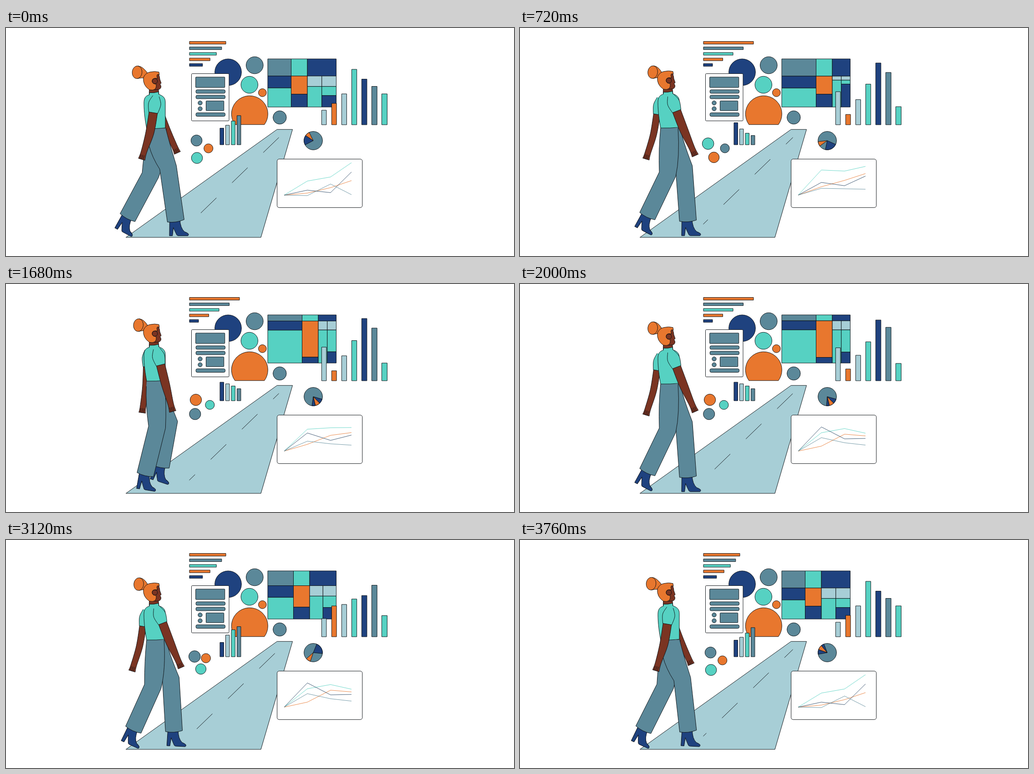
These frames come from a looping animation (1116 by 502 pixels, 3840 ms). An HTML page with a canvas:

```html
<!DOCTYPE html>
<html lang="en">
<head>
<meta charset="utf-8">
<title>Walking through data</title>
<style>
html, body { margin: 0; width: 100%; height: 100%; overflow: hidden; background: #fff; }
canvas { display: block; }
</style>
</head>
<body>
<canvas id="stage" width="1116" height="502"></canvas>
<script>
const ctx = document.getElementById('stage').getContext('2d');
const ORANGE = '#e8772e', SLATE = '#5b8899', TEAL = '#56d1c2', NAVY = '#1f427f',
  LIGHT = '#a7ced6', SKIN = '#7a3422', INK = '#0b0f14';
const LOOP = 3840, STEP = 80, STRIDE = 1280, RAD = Math.PI / 180;

const lerp = (a, b, p) => a + (b - a) * p;
const mix = (a, b, p) => a.map((v, i) => Array.isArray(v) ? mix(v, b[i], p) : lerp(v, b[i], p));
const ease = p => p * p * (3 - 2 * p);
const part = (t, a, b) => Math.min(1, Math.max(0, (t - a) / (b - a)));
const span = (t, a, b) => ease(part(t, a, b));
const bump = (t, mid, half) => Math.max(0, 1 - ((t - mid) / half) ** 2);
const ramp = ([first, step, bend], i) => first + step * i + bend * i * i;

// Moves through the states, one [start, end] pair per change, and back to the first.
function tween(t, states, spans) {
  let i = 0;
  while (i < spans.length - 1 && t >= spans[i + 1][0]) i++;
  return mix(states[i], states[(i + 1) % states.length], span(t, ...spans[i]));
}

function paint(fill, stroke = INK) {
  if (fill) { ctx.fillStyle = fill; ctx.fill(); }
  if (stroke) { ctx.strokeStyle = stroke; ctx.stroke(); }
}
function box(x0, y0, x1, y1, fill, r = 0) {
  ctx.beginPath();
  ctx.roundRect(x0, y0, x1 - x0, y1 - y0, r);
  paint(fill);
}
function disc(x, y, r, fill) {
  ctx.beginPath();
  ctx.arc(x, y, r, 0, 7);
  paint(fill);
}
function poly(pts, fill, stroke = INK, close = true) {
  ctx.beginPath();
  pts.forEach(p => ctx.lineTo(...p));
  if (close) ctx.closePath();
  paint(fill, stroke);
}
function shape(d, fill) {
  const p = new Path2D(d);
  ctx.fillStyle = fill;
  ctx.fill(p);
  ctx.strokeStyle = INK;
  ctx.stroke(p);
}

// ---- Scenery ----
function road(t) {
  poly([[263.5, 461], [595.5, 223.3], [629.5, 223.3], [560, 461]], LIGHT);
  const right = 599.5, left = 402.5, gap = 68.6;
  for (let x = right + gap - t * 0.0688 % gap; x > left; x -= gap) {
    const a = Math.min(x, right), b = Math.max(x - gap / 2, left);
    if (a > b) poly([a, b].map(v => [v, 241 + (right - v) * 0.9695]), null, INK, false);
  }
}

function rankBars(t) {
  const curve = tween(t, [[80, -8, -1.2], [110, -22.5, 0]], [[0, 720], [2160, 2880]]);
  [ORANGE, SLATE, TEAL, ORANGE, NAVY].forEach((fill, i) => {
    const y = 29.6 + i * 12.2;
    box(403, y, 403 + ramp(curve, i), y + 5.8, fill);
  });
}

function page() {
  disc(488, 97.3, 29.3, NAVY);
  box(407.5, 100.5, 490, 204.5, '#fff', 2);
  box(416.7, 108, 480.7, 131, SLATE, 1);
  for (const y of [136, 148, 186.7]) box(417.2, y, 481.5, y + 7.8, SLATE, 3);
  for (const y of [165, 177.8]) disc(426.5, y, 4.6, SLATE);
  box(439.5, 160.5, 478.7, 182, SLATE, 1);
}

function bubbles() {
  disc(546.3, 82, 18.8, SLATE);
  disc(534.8, 125, 18.7, TEAL);
  disc(563.3, 142.4, 8.8, ORANGE);
  disc(601.3, 197, 14.7, SLATE);
  ctx.beginPath();
  const a = Math.asin(23.5 / 40);
  ctx.arc(535.3, 189.2, 40, Math.PI - a, a);
  ctx.closePath();
  paint(ORANGE);
}

// First column edge, top row edge, then each lower cut as a share of the rest.
const TILES = [
  [626.5, 105.7, 0.385, 0.585, 0.337, 0.63],
  [650.5, 106, 0.385, 0.585, 0.13, 0.257],
  [650.5, 81, 0.215, 0.866, 0.215, 0.742]
];
function treemap(t) {
  const [x1, top, ...cuts] = tween(t, TILES, [[0, 720], [1020, 1740], [2640, 3320]]);
  const [y1, y2, y3, y4] = cuts.map(c => lerp(top, 174, c));
  const x2 = x1 + 35.6, end = 725.5, x3 = (x2 + end) / 2;
  const column = (a, b, ys, fills) => fills.forEach((f, i) => box(a, ys[i], b, ys[i + 1], f));
  column(575, x1, [68, top, y1, 174], [SLATE, NAVY, TEAL]);
  column(x1, x2, [68, top, y2, 174], [TEAL, ORANGE, NAVY]);
  column(x2, end, [68, top], [NAVY]);
  column(x2, x3, [top, y3, 174], [LIGHT, TEAL]);
  column(x3, end, [top, y3, y4, 174], [LIGHT, TEAL, NAVY]);
}

const TALL = [
  [32, 47, 68, 122, 100.5, 84.5, 68],
  [74, 22, 55, 88.5, 137, 116, 39],
  [49, 91, 74.5, 40, 80, 145.5, 23]
];
function tallBars(t) {
  const heights = tween(t, TALL, [[0, 800], [1860, 2830], [2810, 3410]]);
  [LIGHT, ORANGE, LIGHT, TEAL, NAVY, SLATE, TEAL].forEach((fill, i) => {
    const x = 693.4 + i * 22;
    box(x, 213 - heights[i], x + 10.5 + i * 0.25, 213, fill);
  });
}

function shortBars(t) {
  const curve = tween(t,
    [[36.5, 5, 1.4], [48.5, -16, 2.2], [40.8, -3, -0.6], [31.5, 18.5, -2.3]],
    [[0, 720], [740, 1340], [2240, 3040], [3120, 3700]]);
  [NAVY, LIGHT, TEAL, SLATE].forEach((fill, i) => {
    const x = 470 + i * 12.5;
    box(x, 257 - ramp(curve, i), x + 8.4, 257, fill);
  });
}

// Three dots turn around a shared centre in three moves, drawing closer on the way.
function dots(t) {
  let turn = 0, pull = 1;
  for (const [a, b, deg] of [[0, 720, 107], [960, 1700, 133], [2640, 3320, 120]]) {
    const p = span(t, a, b);
    turn += deg * p;
    pull -= 1.2 * p * (1 - p);
  }
  for (const [fill, from, dist] of [[SLATE, -115, 22.3], [ORANGE, -10, 17], [TEAL, 115, 20]]) {
    const a = (from + turn) * RAD, d = dist * pull;
    disc(428 + Math.cos(a) * d, 268 + Math.sin(a) * d, 11.6 - 1.6 * Math.cos(a), fill);
  }
}

function pie(t) {
  const slice = (a, b, fill) => {
    if (b - a < 0.5) return;
    ctx.beginPath();
    ctx.moveTo(675, 248);
    ctx.arc(675, 248, 20.3, a * RAD, b * RAD);
    ctx.closePath();
    paint(fill);
  };
  const mid = -131 - 168 * span(t, 0, 1620) + 168 * part(t, 2000, LOOP) ** 2;
  const gap = 42 * bump(t, 720, 360) + 104 * bump(t, 3180, 500);
  const wide = 30 + 52 * bump(t, 500, 800) + 52 * bump(t, 2880, 600);
  const thin = 22 * bump(t, 1680, 800) + 24 * bump(t, 3700, 130);
  const low = mid - 15, high = mid + 15;
  disc(675, 248, 20.3, SLATE);
  slice(low - gap - wide, low - gap, NAVY);
  slice(high, high + thin, NAVY);
  slice(low, high, ORANGE);
}

// Heights of the three later points of each line.
const TRENDS = [
  [[31, 40, 71.5], [4.5, 16.5, 32], [11, 5.5, 51], [-1, 24.5, 1]],
  [[55.3, 53, 63.3], [18.5, 32.5, 47.5], [28, 20.7, 42], [15, 14, 13]],
  [[40.5, 49.7, 39.5], [11, 37.3, 33.5], [53.3, 27, 28], [29.7, 18.5, 13.3]]
];
function lineChart(t) {
  box(595.6, 288.6, 782.8, 395.4, '#fff', 4.5);
  const lines = tween(t, TRENDS, [[0, 700], [1400, 1980], [3160, 3740]]);
  ctx.lineWidth = 0.85;
  [TEAL, ORANGE, '#24405f', SLATE].forEach((color, i) => {
    const pts = [0, ...lines[i]].map((h, k) => [611 + k * 50 - (k > 2 ? 2 : -k), 368 - h]);
    poly(pts, null, color, false);
  });
  ctx.lineWidth = 0.95;
}

// ---- Walker ----
function unit(a, b) {
  const x = b[0] - a[0], y = b[1] - a[1], l = Math.hypot(x, y);
  return [x / l, y / l];
}

function shoe(x, y, deg) {
  ctx.save();
  ctx.translate(x, y);
  ctx.rotate(deg * RAD);
  shape('M-13.5-2 L-14 33 H-7.3 L-5.3 15 Q-2 23 2 31 Q3 33 6 33 H26 Q29 32 27.5 28.5 Q25 26 19 24 Q10 16 9-3 Z', NAVY);
  ctx.restore();
}

function leg(u, bob, near) {
  const turn = u / STRIDE * 2 * Math.PI;
  const front = (1 + Math.cos(turn)) / 2, back = 1 - front;
  const lift = Math.max(0, -Math.sin(turn)) ** 2;
  const side = near ? 0 : 1, waist = 221 + bob;
  const knee = [321 + 35 * front + 12 * lift + side * (6 * front - 4 * back), 307 + 17 * back ** 2 - 6 * lift];
  const ankle = [276 + 97 * front - side * 9 * back, 424.5 - 7 * back - 24 * lift];
  const shin = unit(knee, ankle), thigh = unit([331, waist], knee);
  const bend = unit([0, 0], [thigh[0] + shin[0], thigh[1] + shin[1]]);
  const off = (p, d, w) => [p[0] + d[1] * w, p[1] - d[0] * w];
  const kl = off(knee, bend, -18.7), kr = off(knee, bend, 18.7);
  const al = off(ankle, shin, -18.6), ar = off(ankle, shin, 18.6);
  const lTop = [309, waist], rTop = [near ? lerp(347, 351, front) : 352, waist];
  const lCtl = [lerp(304, 309, front), waist + 45], rCtl = [lerp(351, 357, front), waist + lerp(67, 25, front)];
  shoe(...ankle, 28 * back ** 3 + 20 * lift);
  const trace = cut => {
    ctx.beginPath();
    const q = mix(lTop, lCtl, cut), r = mix(lCtl, kl, cut);
    ctx.moveTo(...mix(q, r, cut));
    ctx.quadraticCurveTo(...r, ...kl);
    ctx.lineTo(...al);
    ctx.quadraticCurveTo(ankle[0] + shin[0] * 5, ankle[1] + shin[1] * 5, ...ar);
    ctx.lineTo(...kr);
    ctx.quadraticCurveTo(...rCtl, ...rTop);
  };
  trace(0);
  paint(SLATE, near ? null : INK);
  if (near) {
    trace(0.42 * front);
    paint(null);
  }
}

// Smooth tapered tube through [x, y, half width] points, open at the start.
function limb(pts, fill) {
  const last = pts.length - 1, at = (c, i) => c[Math.min(last, Math.max(0, i))];
  const edge = s => pts.map((p, i) => {
    const d = unit(at(pts, i - 1), at(pts, i + 1));
    return [p[0] - s * d[1] * p[2], p[1] + s * d[0] * p[2]];
  });
  ctx.beginPath();
  for (const c of [edge(1), edge(-1).reverse()]) {
    ctx.lineTo(...c[0]);
    for (let i = 0; i < last; i++) {
      const a = at(c, i - 1), b = c[i], e = c[i + 1], f = at(c, i + 2);
      ctx.bezierCurveTo(b[0] + (e[0] - a[0]) / 6, b[1] + (e[1] - a[1]) / 6,
        e[0] - (f[0] - b[0]) / 6, e[1] - (f[1] - b[1]) / 6, ...e);
    }
  }
  paint(fill);
}

// An arm hung from the shoulder; fwd runs from 0 (back) to 1 (forward).
function arm(x, y, fwd, size) {
  const upper = lerp(-9.5, 21, fwd) * RAD, fore = lerp(-17, 24, fwd) * RAD;
  const along = ([px, py], a, d) => [px + Math.sin(a) * d, py + Math.cos(a) * d];
  const top = [x, y], elbow = along(top, upper, 84);
  const tip = along(elbow, fore, 62 * size ** 0.3);
  limb([[...along(top, upper, 36), 9.4 * size], [...elbow, 9 * size],
    [...along(elbow, fore, 44), 6.3], [...tip, 7.4]], SKIN);
  for (const s of [-3, 0.5, 4]) {
    const end = [tip[0] - Math.cos(fore) * s, tip[1] + Math.sin(fore) * s];
    poly([end, along(end, fore, -10)], null, INK, false);
  }
  limb([[...along(top, upper, 3), 7 * size], [...along(top, upper, 20), 13.5 * size],
    [...along(top, upper, 40), 10 * size]], TEAL);
}

function head(swing) {
  shape('M315 128 L314.5 146 H336 L334 128 Z', SKIN);
  shape('M324 98 L335 101 Q338 108 338 113 L341 121.5 L338.5 123.5 L340.5 128 Q341 134 335 135.5 L326 136 L320 116 Z', SKIN);
  const x = 288 + swing * 3.6, y = 97.5 + swing;
  shape(`M${x + 2} ${y - 14} Q${x + 13} ${y - 13} 313 102 L304 111 Q${x + 12} ${y + 11} ${x + 1} ${y + 14} Z`, ORANGE);
  ctx.beginPath();
  ctx.ellipse(x, y, 10.8, 14, 0.1, 0, 7);
  paint(ORANGE);
  shape('M303 107 Q307 99 316 97 Q327 94.5 336 97 L337 103 L333 102 Q330 105 333 111 Q320 109 321 118 Q323 124 329 123 Q332 129 327 135 Q322 138 315 136 Q300 126 302 109 Z', ORANGE);
  disc(327, 117, 5.8, SKIN);
}

function walker(t) {
  const u = t % STRIDE;
  const swing = ease((1 - Math.cos(u / STRIDE * 2 * Math.PI)) / 2);
  const bob = -9 * Math.sin(u / 640 * Math.PI) ** 2;
  const lifted = draw => {
    ctx.save();
    ctx.translate(0, bob);
    draw();
    ctx.restore();
  };
  lifted(() => arm(lerp(323, 307, swing), lerp(144, 152, swing), 1 - swing, 0.78));
  leg((u + STRIDE / 2) % STRIDE, bob, false);
  leg(u, bob, true);
  lifted(() => {
    head(swing);
    shape('M315 142.5 L315 147 C307 149 303 154 303 165 C303 186 306 205 309 221.5 Q330 222 350 220 V163 C350 153 344 149 335.5 146 L335 140.5 Q325 143.5 315 142.5 Z', TEAL);
    arm(330, 147, swing, 1);
  });
}

function frame(now) {
  const t = Math.floor(now % LOOP / STEP) * STEP;
  ctx.fillStyle = '#fff';
  ctx.fillRect(0, 0, 1116, 502);
  ctx.lineWidth = 0.95;
  ctx.lineJoin = 'round';
  road(t);
  rankBars(t);
  page();
  bubbles();
  treemap(t);
  tallBars(t);
  shortBars(t);
  dots(t);
  pie(t);
  lineChart(t);
  walker(t);
}

const start = performance.now();
function tick() {
  frame(performance.now() - start);
  requestAnimationFrame(tick);
}
tick();
</script>
</body>
</html>
```
